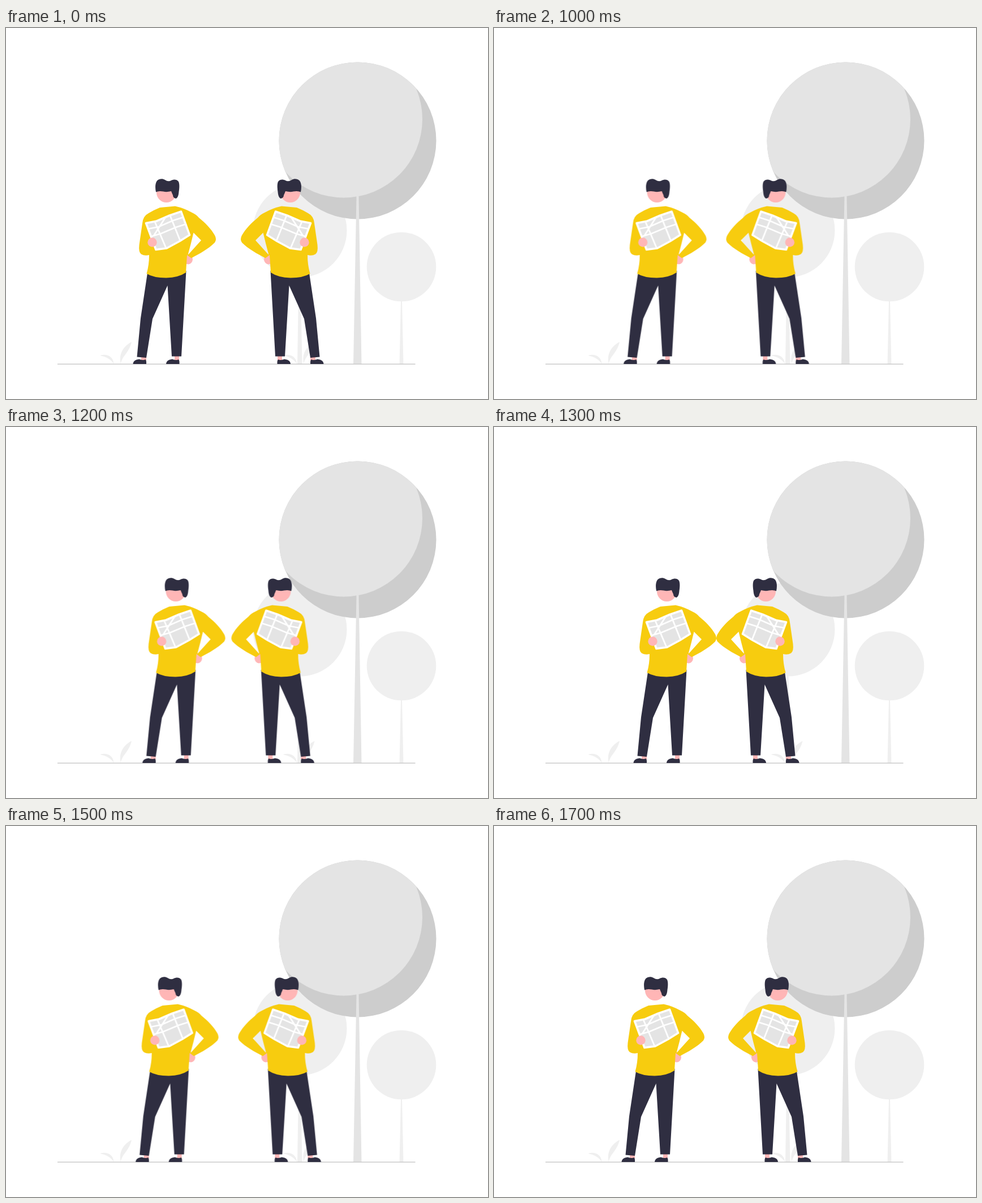
Recreate the animation shown at these times as an HTML page. Size 852 px wide and 657 px high, loop 1.8 s.

```html
<!DOCTYPE html>
<html lang="en">
<head>
<meta charset="utf-8">
<title>Two people with maps</title>
<style>
  html, body { margin: 0; width: 100%; height: 100%; overflow: hidden; background: #fff; }
  svg { display: block; width: 852px; height: 657px; }
  .pale { fill: #efefef; }
  .light { fill: #e4e4e4; }
  .shade { fill: #cdcdcd; }
  .dark { fill: #2f2e41; }
  .skin { fill: #ffb6b6; }
  .shirt { fill: #f7cc0f; }
  .roads { fill: none; stroke: #fff; stroke-width: 2.8; }
  .walk { animation: walk 1.8s step-end infinite; }
  /* accelerate towards the middle, then settle back */
  @keyframes walk {
    0% { transform: translateX(0); }
    44.44% { transform: translateX(1px); }
    50% { transform: translateX(2.2px); }
    55.55% { transform: translateX(4.6px); }
    61.11% { transform: translateX(10px); }
    66.66% { transform: translateX(16.6px); }
    72.22% { transform: translateX(22px); }
    77.77% { transform: translateX(10px); }
    83.33% { transform: translateX(4.6px); }
    88.88% { transform: translateX(2.2px); }
    94.44%, 100% { transform: translateX(1px); }
  }
</style>
</head>
<body>
<svg viewBox="0 0 852 657">
  <defs>
    <clipPath id="crown"><circle cx="621.5" cy="199.5" r="139"/></clipPath>

    <g id="plant" class="pale">
      <path d="M166 580C180 576 190 583 190.500 595C186 587 177 582 166 580Z"/>
      <path d="M222 556C206 564 199 579 203 595C205 580 217 577 222 556Z"/>
    </g>

    <path id="shoe" class="dark" d="M224.500 595C225 589 230 587 236 586.500C240 588.500 244 588 246.500 587Q248.500 589 248 595Z"/>

    <g id="person">
      <path class="skin" d="M239 581H248V589H239ZM298 580H306V589H298Z"/>
      <use href="#shoe"/>
      <use href="#shoe" x="58.5"/>
      <path class="dark" d="M250 434L238 514L231.500 582.500L248 584L259 515L285.500 456L293 581.500H310L318.500 430Z"/>

      <ellipse class="skin" cx="322" cy="409.500" rx="8" ry="9"/>
      <path class="shirt" fill-rule="evenodd" d="M272 318L299 315.500Q315 319 329 327Q336 330 341 336C352 345 363 356 369 367Q373 374 369 380C358 391 342 400 327.500 407.500L320 402L318 433Q305 442 283 442.500Q261 442.500 248.500 435Q253 420 253 402Q245 404 239 400.500Q234 397 235.500 384L241 346Q242 333 252 328Q262 322 272 318ZM331.500 362.500Q327 382 321.500 402L345 376Z"/>

      <path class="light" d="M247.500 345.500L266 342L289 332L309.500 325L324.500 366.500L307 377.500L284 390L265 392.500Z" stroke="#fff" stroke-width="3.6" stroke-linejoin="round"/>
      <path class="roads" d="M263 343L283 390M290 332L308 377M250 356L270 352L295 341L314 335M257 369L274 364L300 353L319 347M282 335L261 368"/>
      <circle class="skin" cx="258.500" cy="379.500" r="8.200"/>

      <ellipse class="skin" cx="283.500" cy="291" rx="17.500" ry="18"/>
      <path class="dark" d="M265 290.500C263.500 283 263.500 275 267 270.500C271 266.500 277 266.500 281 269Q287 273 292 270C297 267.500 302 268 305 272C307 276 306.500 284 305.500 290C305 296 304 300 300.500 302Q295 301 295 296Q293.500 293 292 289Q284 291 278 289.500Q270 288 265 290.500Z"/>
    </g>
  </defs>

  <circle class="pale" cx="519.500" cy="358.500" r="83"/>
  <path class="pale" d="M517.500 438H520.500L523.500 595H515Z"/>
  <circle class="pale" cx="699" cy="423" r="61.300"/>
  <path class="pale" d="M698 483H700L702.500 596H695.500Z"/>

  <g clip-path="url(#crown)">
    <circle class="shade" cx="621.500" cy="199.500" r="140"/>
    <circle class="light" cx="597" cy="161.500" r="139"/>
  </g>
  <path class="light" d="M619.500 298H623.500L628.500 595H614Z"/>

  <use href="#plant"/>
  <use href="#plant" x="323.5"/>
  <path d="M91 595.300H723.500" stroke="#cbcbcb" stroke-width="1.600"/>

  <g><use class="walk" href="#person"/></g>
  <g transform="translate(786) scale(-1 1)"><use class="walk" href="#person"/></g>
</svg>
</body>
</html>
```
